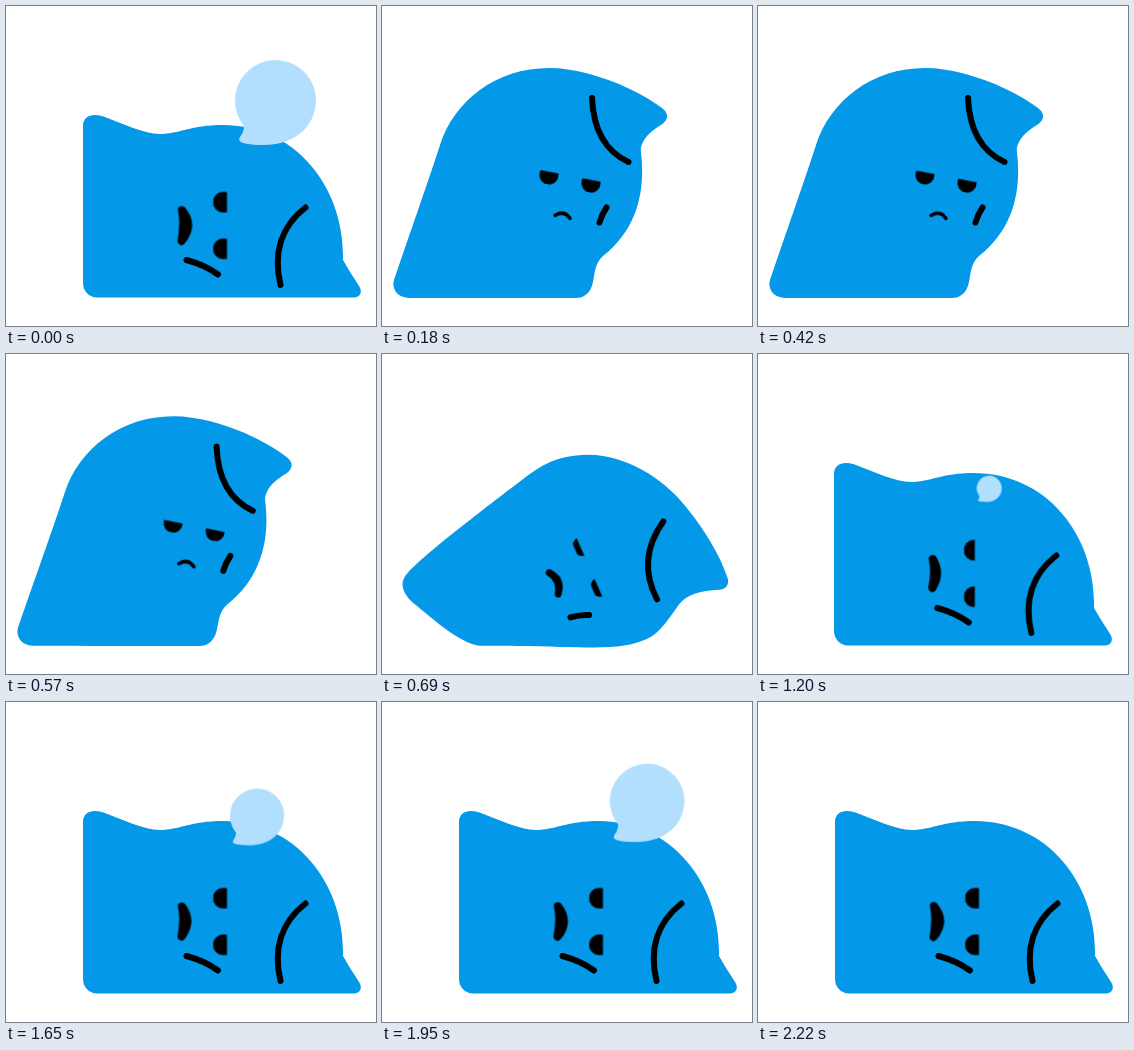
Animation of 370 by 320 pixels, one loop 2.28 s. Source, as an HTML page without scripts:

```html
<!DOCTYPE html>
<html lang="en">
<head>
<meta charset="utf-8">
<title>Dozing off</title>
<style>
html, body { margin: 0; width: 100%; height: 100%; overflow: hidden; background: #fff; }
svg { display: block; width: 370px; height: 320px; }

svg * { animation: 2280ms linear infinite; }
.body { fill: #0398e8; animation-name: topple; }
.body-settle { transform-origin: 0 291px; animation-name: body-settle; }
.details { animation-name: details-settle; }
.limb { fill: none; stroke: #000; stroke-width: 6px; stroke-linecap: round; }
.crease { animation-name: crease; }
.arm { animation-name: arm; }
.face { animation-name: face; }
.eye { animation-name: lids; }
.mouth { stroke: #000; stroke-linecap: round; stroke-linejoin: round; animation-name: mouth; }
.bubble { fill: #b3dfff; transform-origin: 214px 152px; animation-name: bubble; }

/* Lying for one tick, cut to upright, then tip over to the right */
@keyframes topple {
  0%, 1.31%, 34.21%, 100% { d: path("M77 277 C77 225 77 172 77 120 C77 110 86 107 96 110 C115 117 139 128 154 128 C172 128 186 119 216 119 C291 119 339 183 337 254 C342 263 348 272 353 280 C357 286 354 291.500 348 291.500 C330 291.500 310 291.500 290 291.500 C240 291.500 200 291.500 150 291.500 C130 291.500 110 291.500 91 291.500 C83 291.500 77 285 77 277Z"); }
  1.311%, 25% { d: path("M194 292 C140 292 80 292 27 292 C15 292 8 282 13 271 C28 227 46 176 58 139 C72 95 114 62 167 62 C192 62 217 70 237 78 C253 85 268 93 280 102 C287 107 287 114 279 119 C270 124 257 135 259 147 C263 180 258 221 221 250 C213 257 213 266 211 276 C209 286 203 292 194 292Z"); }
  30.26% { d: path("M97 292 C75 288 52 267 30 250 C19 240 16 229 25 220 C45 198 115 145 133 131 C155 114 170 101 207 100.500 C243 101 280 123 303 151 C322 174 338 201 345 222 C348 229 344 235 337 235 C318 236 304 240 297 250 C285 268 279 277 270 283 C245 297 210 293 180 293 C150 292 124 292 97 292Z"); }
}
@keyframes body-settle {
  0%, 30.26%, 61.4%, 100% { transform: translate(0px) scale(1, 1); }
  34.21% { transform: translate(1.5px) scale(1, 1); }
  38.16% { transform: translate(-4px) scale(1, .993); }
  48.68% { transform: translate(-2.8px) scale(1, .996); }
  52.63% { transform: translate(-1px) scale(1, 1); }
}
@keyframes details-settle {
  0%, 30.26%, 61.4%, 100% { transform: translate(0px, 0px); }
  34.21% { transform: translate(1px, 0px); }
  38.16% { transform: translate(-6px, 1.5px); }
  48.68% { transform: translate(-3.5px, .7px); }
  52.63% { transform: translate(-1.2px, 0px); }
}
@keyframes crease {
  0%, 1.31%, 34.21%, 100% { d: path("M299.500 201.500 Q263 230 274.500 279"); }
  1.311%, 25% { d: path("M210 92 Q212 140 246.500 156"); }
  30.26% { d: path("M281 167 Q254 205 275 245"); }
}
@keyframes arm {
  0%, 1.31%, 34.21%, 100% { d: path("M180.500 254 Q199 259 212 268.500"); }
  1.311%, 25% { d: path("M217.500 216.500 Q220 208 224.500 201.500"); }
  30.26% { d: path("M188.500 263.500 Q198 260.500 207 261"); }
}
@keyframes face {
  0%, 1.31%, 34.21%, 100% { transform: translate(217.5px, 219.5px) rotate(90deg) scale(1); }
  1.311%, 25% { transform: translate(188px, 173px) rotate(11deg) scale(.92); }
  30.26% { transform: translate(209.6px, 212.3px) rotate(66deg) scale(.955); }
}
@keyframes lids {
  0%, 1.31%, 72.37%, 100% { clip-path: inset(7px 0px 0px 0px); }
  1.311% { clip-path: inset(6.5px 0px 0px 0px); }
  18.42% { clip-path: inset(7.8px 0px 0px 0px); }
  25% { clip-path: inset(9px 0px 0px 0px); }
  30.26% { clip-path: inset(13px 0px 1.7px 0px); }
  38.16% { clip-path: inset(11.2px 0px 3.8px 0px); }
  52.63% { clip-path: inset(10px 0px 0px 0px); }
}
@keyframes mouth {
  0%, 1.31%, 97.37%, 100% { stroke-width: 8px; d: path("M-15.500 41.500 Q0 29 15.500 42 Q0 39 -15.500 41.500Z"); }
  1.311%, 25% { stroke-width: 3.8px; d: path("M-8.400 42 Q0 34 8.200 42 Q0 34 -8.400 42Z"); }
  30.26% { stroke-width: 7px; d: path("M-12 43.500 Q0 33 12.500 44 Q0 35 -12 43.500Z"); }
  38.16%, 52.63% { stroke-width: 8px; d: path("M-14.500 41.500 Q0 33 14.500 42 Q0 39 -14.500 41.500Z"); }
  72.37% { stroke-width: 8px; d: path("M-15 41.500 Q0 30.500 15 42 Q0 39 -15 41.500Z"); }
}
@keyframes bubble {
  0%, 1.31% { transform: scale(1); }
  1.311%, 44.74% { transform: scale(0); }
  52.63% { transform: scale(.309); }
  72.37% { transform: scale(.667); }
  93.42% { transform: scale(1.072); animation-timing-function: step-end; }
  94.73%, 100% { transform: scale(0); }
}
</style>
</head>
<body>
<svg viewBox="0 0 370 320">
  <g class="body-settle"><path class="body"/></g>
  <g class="details">
    <path class="limb crease"/>
    <path class="limb arm"/>
    <g class="face">
      <circle class="eye" cx="-23.3" r="10.5"/>
      <circle class="eye" cx="23.3" r="10.5"/>
      <path class="mouth"/>
    </g>
  </g>
  <path class="bubble" d="M238 120 A40.5 40.5 0 1 1 310 94 C310 118 290 146 239 137.500 Q231 136 234 131 Q238 126 238 120Z"/>
</svg>
</body>
</html>
```
